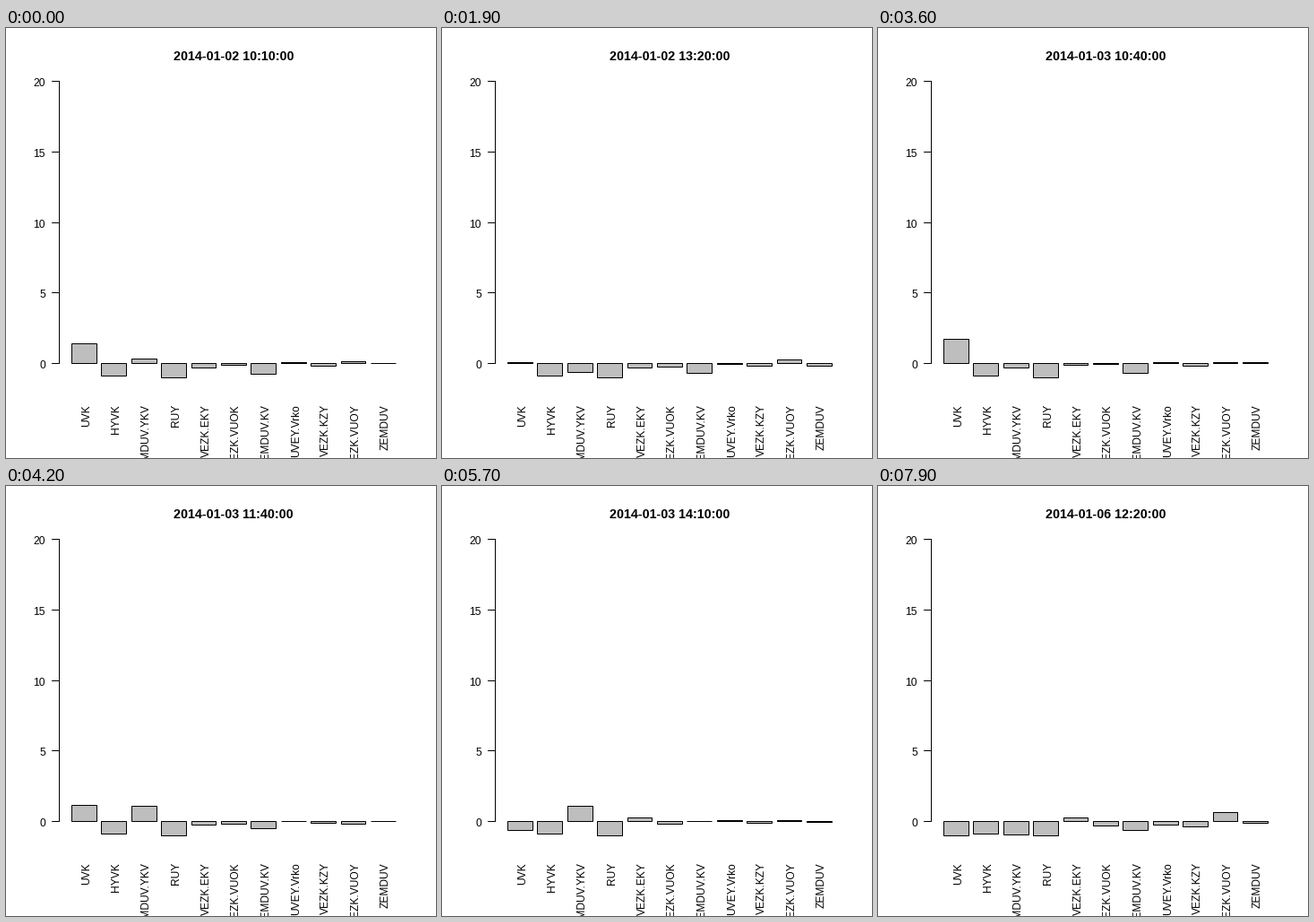
Recreate the animation shown at these times as a matplotlib script. Size 480 by 480 pixels, loop 8 s.

```python
import numpy as np
import matplotlib.pyplot as plt
from matplotlib.animation import FuncAnimation
from matplotlib.patches import Rectangle

SIZE, DPI, FRAMES = 480, 100, 80
LEFT, RIGHT, TOP, BOTTOM = 59.04, 449.76, 59.04, 406.56  # plot region in px
PX = 72 / DPI  # points per pixel
SPIKE_STEP, SPIKE = 9, 25


def x_px(u):
    return LEFT + (u + .32) * (RIGHT - LEFT) / 14.04


def y_px(v):
    return TOP + (20 - v) * (BOTTOM - TOP) / 22


def snap(p):
    return np.floor(p) + .5


def bump(center, width):
    return np.exp(-((np.arange(FRAMES) - center) / width) ** 2)


def make_venues():
    """Relative deviation of each venue from its usual volume, per step."""
    surge = bump(11, 6) + .65 * bump(79, 6)
    flat = np.ones(FRAMES)
    venues = {
        "UVK": 2.6 * bump(5, 15) + 2.75 * bump(37, 9) + 1.6 * bump(65, 7) - 1,
        "HYVK": -.85 * flat,
        "ZEMDUV.YKV": 1.6 * bump(4, 12) + 3.3 * bump(49, 10) - .9,
        "RUY": -flat,
        "VEZK.EKY": 1.5 * bump(69, 12) - .35 * surge - .2,
        "VEZK.VUOK": -.25 * surge - .12,
        "ZEMDUV.KV": .75 * bump(58, 14) - .7,
        "UVEY.Vrko": .1 - .55 * surge,
        "VEZK.KZY": -.33 * surge - .1,
        "VEZK.VUOY": 1.2 * surge,
        "ZEMDUV": .05 - .3 * surge,
    }
    # Volume jitters in proportion to itself
    rng = np.random.default_rng(14)
    for name, v in venues.items():
        venues[name] = (1 + v) * (1 + .07 * rng.normal(size=FRAMES)) - 1
    venues["UVK"][SPIKE_STEP] = SPIKE
    return venues


def stamp(step):
    day, slot = divmod(step, 33)
    hour, minute = divmod(610 + 10 * slot, 60)
    return f"2014-01-{(2, 3, 6)[day]:02d} {hour:02d}:{minute:02d}:00"


plt.rcParams["font.family"] = "Liberation Sans"
fig = plt.figure(figsize=(SIZE / DPI, SIZE / DPI), dpi=DPI, facecolor="white")
ax = fig.add_axes([0, 0, 1, 1])
ax.set(xlim=(0, SIZE), ylim=(SIZE, 0))
ax.axis("off")


def line(xs, ys):
    ax.plot(xs, ys, color="black", lw=PX, solid_capstyle="projecting",
            snap=False)


axis_x = snap(LEFT)
line([axis_x, axis_x], [snap(y_px(20)), snap(y_px(0))])
for tick in range(0, 21, 5):
    y = snap(y_px(tick))
    line([axis_x - 8, axis_x], [y, y])
    ax.text(44, y + 5.5, str(tick), size=12 * PX, ha="right", va="baseline")

venues = make_venues()
bars = []
for i, name in enumerate(venues):
    start = .2 + 1.2 * i
    x0, x1 = snap(x_px(start)), snap(x_px(start + 1))
    bar = Rectangle((x0, snap(y_px(0))), x1 - x0, 0, fc="#bebebe", ec="black",
                    lw=PX, joinstyle="miter", snap=False)
    bars.append(ax.add_patch(bar))
    ax.text(x_px(start + .5) + 5.6, 420, name, size=12 * PX, rotation=90,
            rotation_mode="anchor", ha="right", va="baseline")

title = ax.text((LEFT + RIGHT) / 2 - .4, 36, "", size=14.2 * PX,
                weight="bold", ha="center", va="baseline")


def draw(step):
    title.set_text(stamp(step))
    for bar, v in zip(bars, venues.values()):
        bar.set_height(snap(y_px(v[step])) - bar.get_y())
    return [title, *bars]


anim = FuncAnimation(fig, draw, frames=FRAMES, interval=100, repeat=True,
                     repeat_delay=0)
plt.show()
```
